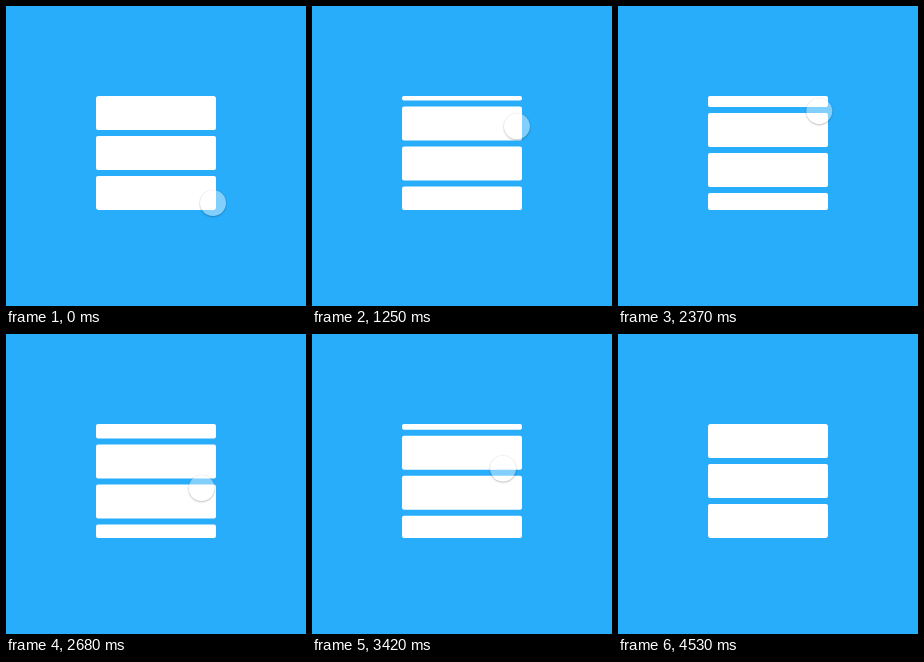
Animation of 300x300 px, one loop 5.56 s. Source, as an HTML page:

```html
<!DOCTYPE html>
<html lang="en">
<head>
<meta charset="utf-8">
<title>Endless list</title>
<style>
  html, body { margin: 0; width: 100%; height: 100%; overflow: hidden; background: #28adfa; }
  svg { display: block; width: 300px; height: 300px; }
  #touch {
    position: absolute; left: -13px; top: -13px;
    width: 26px; height: 26px; border-radius: 50%;
    background: rgba(255, 255, 255, .42);
    box-shadow: 0 0 1px rgba(0, 0, 0, .16), 0 1px 2px rgba(0, 0, 0, .24);
  }
</style>
</head>
<body>
<svg viewBox="0 0 300 300">
  <clipPath id="view"><rect x="90" y="90" width="120" height="114" rx="2"/></clipPath>
  <g clip-path="url(#view)"><g id="list" fill="#fff"></g></g>
</svg>
<div id="touch"></div>
<script>
const LOOP = 5560, PITCH = 40;
const FADE_START = 4320, FADE_TIME = 210;
const list = document.getElementById('list');
const touch = document.getElementById('touch');

// Where the finger turns round, and how far the list has scrolled by then.
const turns = [
  { at: 450, x: 207, y: 197, scroll: 0 },
  { at: 1050, x: 208, y: 106, scroll: 40 },
  { at: 1770, x: 191, y: 185.5, scroll: -18.5 },
  { at: 2240, x: 202, y: 99, scroll: 68.5 },
  { at: 3040, x: 191, y: 194, scroll: -16 },
  { at: 3490, x: 191, y: 131, scroll: 31 },
  { at: 4000, x: 191, y: 139, scroll: 40 }
];

for (let i = 0; i < 4; i++) {
  const card = document.createElementNS('http://www.w3.org/2000/svg', 'rect');
  const attrs = { x: 90, y: 90 + i * PITCH, width: 120, height: 34, rx: 2 };
  for (const name in attrs) card.setAttribute(name, attrs[name]);
  list.append(card);
}

const clamp = v => Math.min(1, Math.max(0, v));
const swing = u => (1 - Math.cos(Math.PI * clamp(u))) / 2;

function pose(t) {
  const next = turns.findIndex(turn => turn.at > t);
  const i = next < 0 ? turns.length - 1 : Math.max(1, next);
  const a = turns[i - 1], b = turns[i];
  const k = swing((t - a.at) / (b.at - a.at));
  const mix = key => a[key] + (b[key] - a[key]) * k;
  return { x: mix('x'), y: mix('y'), scroll: mix('scroll') };
}

function render(t) {
  const { x, y, scroll } = pose(t);
  const shift = (scroll + PITCH) % PITCH;
  list.setAttribute('transform', `translate(0 ${-shift})`);
  touch.style.transform = `translate(${x}px, ${y}px)`;
  touch.style.opacity = 1 - clamp((t - FADE_START) / FADE_TIME);
}

const start = performance.now();
function tick() {
  render((performance.now() - start) % LOOP);
  requestAnimationFrame(tick);
}
tick();
</script>
</body>
</html>
```
